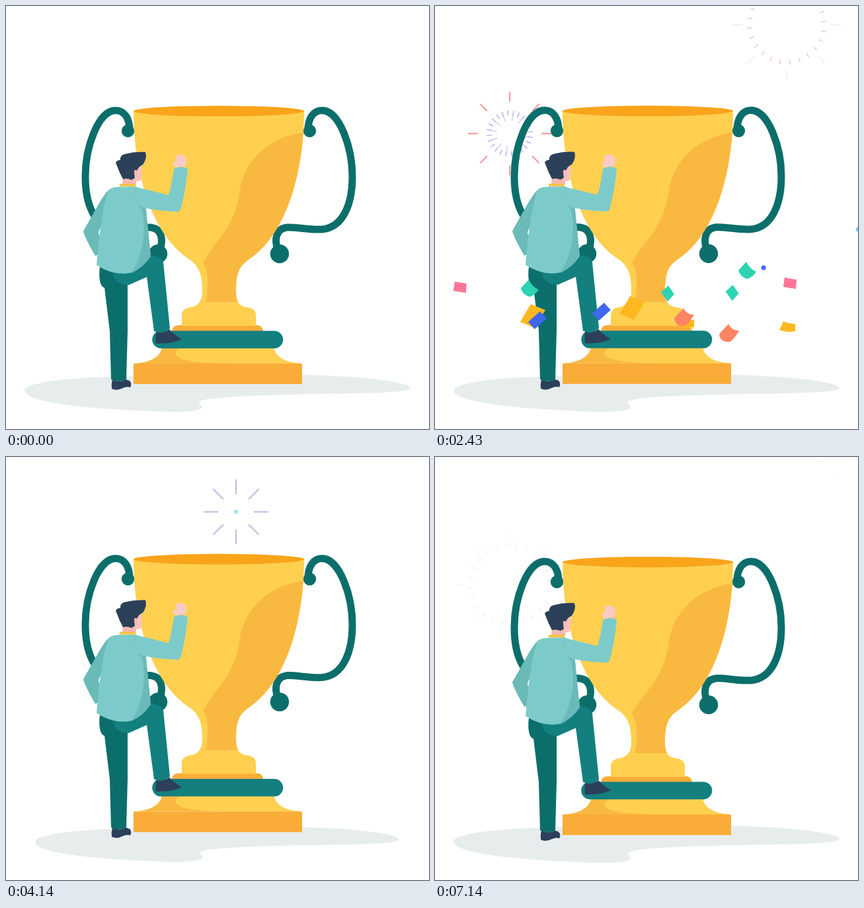
An HTML page with a canvas that plays this animation: 640x640 px, repeating every 7210 ms.

```html
<!DOCTYPE html>
<html lang="en">
<head>
<meta charset="utf-8">
<title>Trophy celebration</title>
<style>
html, body { margin: 0; height: 100%; overflow: hidden; background: #fff; }
canvas { display: block; width: 100vw; height: 100vh; object-fit: contain; }
</style>
</head>
<body>
<canvas id="stage" width="640" height="640"></canvas>
<script>
const ctx = document.getElementById('stage').getContext('2d');
const LOOP = 7210, BOB = LOOP / 3, FIREWORK_CYCLE = 3670;
const NAVY = '#2c405a', TEAL = '#137f7f', DARK_TEAL = '#0c6e6a', SHIRT = '#7ccbca',
      SHIRT_SHADE = '#6abab8', GOLD = '#ffd050', AMBER = '#f9b940', ORANGE = '#f9ac38';

const clamp = v => Math.min(1, Math.max(0, v));
const ramp = (v, from, to) => clamp((v - from) / (to - from));
const fill = (d, color) => { ctx.fillStyle = color; ctx.fill(new Path2D(d)); };
const disc = (x, y, r, color) => {
  ctx.fillStyle = color;
  ctx.beginPath();
  ctx.arc(x, y, r, 0, 7);
  ctx.fill();
};

// Timing curve cubic-bezier(.15, 0, .11, 1)
function ease(x) {
  const bezier = (a, b, s) => 3 * a * s * (1 - s) ** 2 + 3 * b * s * s * (1 - s) + s ** 3;
  let low = 0, high = 1;
  for (let i = 0; i < 24; i++) {
    const mid = (low + high) / 2;
    if (bezier(.15, .11, mid) < x) low = mid; else high = mid;
  }
  return bezier(0, 1, low);
}

function liftAt(t) {
  const phase = (t % BOB) / BOB * 2;
  return phase < 1 ? ease(phase) : 1 - ease(phase - 1);
}

function drawShadow(lift) {
  const scale = 1 - .3 * lift;
  ctx.save();
  ctx.translate(312, 590);
  ctx.scale(scale, scale);
  ctx.translate(-312, -590);
  fill('M28 582C28 568 110 561 190 560C300 557 400 556 448 558C540 560 612 569 612 578C612 587 500 586 430 588C360 590 300 592 292 599C290 603 298 603 296 608C290 615 250 615 220 613C110 609 28 598 28 582Z', '#e7eded');
  ctx.restore();
}

const CUP = 'M193 158C193 250 219 345 277 383C293 394 297 408 297 432C297 446 290 455 278 456Q266 458 266 468V484H378V468Q378 458 366 456C352 455 348 446 348 432C348 405 352 394 368 383C425 345 451 250 451 158Z';

function drawHandle() {
  ctx.strokeStyle = DARK_TEAL;
  ctx.lineWidth = 11;
  ctx.stroke(new Path2D('M457 188C457 170 465 158 478 158C505 158 524 215 524 258C524 300 510 335 478 338C455 339 440 334 425 335C408 337 406 354 411 368'));
  disc(459.5, 189, 9.7, DARK_TEAL);
  disc(414, 375, 14.2, DARK_TEAL);
}

function drawTrophy() {
  drawHandle();
  ctx.save();
  ctx.translate(644, 0);
  ctx.scale(-1, 1);
  drawHandle();
  ctx.restore();

  fill('M236 517C233 533 214 540 193 541H448C426 540 408 533 405 517Z', AMBER);
  fill('M265 517C250 525 254 534 285 538C310 541 340 541 350 541H448C426 540 408 533 405 517Z', GOLD);
  fill('M193 541H448V572H193Z', ORANGE);
  fill('M251 492Q252 483 262 483H379Q388 483 389 492Z', ORANGE);
  fill('M234.500 491.500H406A13.200 13.200 0 0 1 406 518H234.500A13.200 13.200 0 0 1 234.500 491.500Z', TEAL);
  fill(CUP, GOLD);
  ctx.save();
  ctx.clip(new Path2D(CUP));
  fill('M460 191C400 193 360 235 354 278C347 335 320 350 298 388C307 402 307 428 302 448H360V400L460 380Z', AMBER);
  ctx.restore();
  ctx.fillStyle = '#faa41a';
  ctx.beginPath();
  ctx.ellipse(322, 159, 129, 8, 0, 0, 7);
  ctx.fill();
}

function drawMan() {
  fill('M161 565Q172 571 181 565L187 567Q191 572 188 577Q183 575 177 578Q167 583 160 579Q159 572 161 565Z', NAVY);
  fill('M142 395C140 410 142 425 149 426L157 492L159 565Q171 571 182 565L184 492V400Z', DARK_TEAL);
  fill('M227 493Q237 497 247 489Q255 498 266 504Q258 508 245 510L227 511Q226 500 227 493Z', NAVY);
  fill('M161 403Q165 423 186 422L213 410L224 492Q237 497 248 488L238 388Q234 377 220 378Z', TEAL);
  fill('M160 276C150 280 146 290 117 341Q119 350 135 378L140 376Q142 360 143 349Q137 343 143 336L160 300Z', SHIRT_SHADE);
  fill('M155 279C160 272 175 274 196 273C207 276 212 292 213 320L219 378Q210 392 192 403Q165 410 137 392C140 360 144 310 155 279Z', SHIRT);
  fill('M196 278C193 290 200 300 206 310C214 345 204 385 189 404Q207 397 219 379L212 310L208 290Z', SHIRT_SHADE);
  fill('M197 274L246 286Q252 265 254 246Q265 241 275 246Q272 280 264 308Q262 312 256 311Q230 310 212 306Q204 305 200 300Q193 290 197 274Z', SHIRT);
  fill('M256 245L252 238L257 234Q255 226 259 226Q272 223 273 233L272 243Q264 242 256 245Z', '#f8cbc7');
  fill('M177 259H197V270H176Z', '#f4b8b0');
  fill('M172 269H196V273H172Z', '#f7c344');
  fill('M194 246L205 240Q207 248 204 264L196 266Z', '#f9c2bb');
  fill('M173 233Q172 226 180 224Q195 220 211 221Q214 230 207 240Q200 243 199 248Q193 250 195 260L190 263Q183 260 177 262L172 252L166 237Q168 233 173 233Z', NAVY);
  fill('M194 249Q198 246 198 252L197 258Q193 256 194 249Z', '#f4b8b0');
}

function drawSpokes(x, y, count, inner, outer, width, color, alpha, offset = 0) {
  if (alpha <= 0 || outer <= 0) return;
  ctx.globalAlpha = alpha;
  ctx.strokeStyle = color;
  ctx.lineWidth = width;
  ctx.beginPath();
  for (let i = 0; i < count; i++) {
    const angle = offset + i / count * Math.PI * 2, c = Math.cos(angle), s = Math.sin(angle);
    ctx.moveTo(x + c * inner, y + s * inner);
    ctx.lineTo(x + c * outer, y + s * outer);
  }
  ctx.stroke();
  ctx.globalAlpha = 1;
}

const fireworks = [
  { x: 348, y: 83, start: 50, reach: 119, ring: 88, ray: '#c9c2e6', spark: '#efa6ec', core: '#8fe0ee' },
  { x: 532, y: 28.5, start: 870, reach: 82, ring: 60, ray: '#f5709b', spark: '#dda6ee', core: '#86e38c' },
  { x: 113, y: 193, start: 1640, reach: 82, ring: 64, ray: '#f4a0a4', spark: '#b9a2ee', core: '#dcc9f6' }
];

function drawFirework({ x, y, start, reach, ring, ray, spark, core }, time) {
  const age = time - start;
  if (age < 0) return;
  const size = reach / 82;
  const outer = reach * clamp(age / 1025);
  const rayAlpha = 1 - .45 * ramp(age, 850, 1140) - .43 * ramp(age, 1140, 1440) - .12 * ramp(age, 1440, 2700);
  drawSpokes(x, y, 8, Math.max(outer * .45, outer - 15 * size), outer, 2 + .7 * (size - 1) + .3, ray, rayAlpha);

  const sparkAge = age - 400;
  if (sparkAge < 0) return;
  const radius = ring * (1 - (1 - clamp(sparkAge / 1200)) ** 2);
  const length = Math.min(radius * .4, ring * .12);
  const tilt = Math.PI / 18;
  const sparkAlpha = ramp(sparkAge, 180, 420) * (1 - .95 * ramp(sparkAge, 950, 1500) - .05 * ramp(sparkAge, 1500, 2500));
  const coreAlpha = 1 - ramp(sparkAge, 750, 1060);
  drawSpokes(x, y, 12, radius - 2 * length, radius - length, 1.5, core, coreAlpha, tilt);
  drawSpokes(x, y, 24, radius - length, radius, 1.5, core, coreAlpha * (1 - ramp(sparkAge, 180, 420)), tilt);
  drawSpokes(x, y, 24, radius - length, radius, 1.5, spark, sparkAlpha, tilt);
}

const scraps = {
  diamond: ['M-10 -2L1 -12L10 1L0 12Z', '#2ed3b1'],
  leaf: ['M-13 0L-1 -13Q4 -2 14 2Q8 11 0 13Q-11 9 -13 0Z', '#2ed3b1'],
  petal: ['M-14 1L0 -14Q4 -4 16 -4Q8 10 2 13Q-14 14 -14 1Z', '#ff8562'],
  pink: ['M-8 -8L10 -5L9 9L-10 6Z', '#ff7496'],
  square: ['M-3 -18L19 -9L3 18L-19 9Z', '#ffb81f'],
  blue: ['M-14 2L4 -14L14 -3L-4 13Z', '#4067ef'],
  strip: ['M-6 -9Q3 -5 12 -5L12 6Q0 9 -12 4Z', '#ffb81f']
};
for (const [name, color] of [['blueDot', '#4067ef'], ['skyDot', '#74cdf5'], ['pinkDot', '#ff7496'], ['greenDot', '#2ed3b1']])
  scraps[name] = ['M-3.500 0A3.500 3.500 0 1 1 3.500 0A3.500 3.500 0 1 1 -3.500 0Z', color];

// kind, then x and y after launch, mid-flight and at the end, then fade-out end
const confetti = [
  ['square', 14, 454, 298, 457, 345, 525, 3400],
  ['diamond', 41, 432, 352, 435, 330, 511, 3780],
  ['strip', -30, 454, 380, 480, 450, 550, 3400],
  ['petal', 53, 425, 376, 471, 430, 545, 3400],
  ['leaf', 57, 426, 472, 400, 496, 486, 4020],
  ['pink', 97, 414, 537, 419, 512, 510, 3880],
  ['strip', 99, 454, 533, 486, 605, 555, 3400],
  ['petal', -30, 440, 444, 495, 520, 560, 3400],
  ['blueDot', -30, 410, 497, 396, 585, 480, 3500],
  ['skyDot', -30, 390, 640, 338, 750, 420, 3400],
  ['pinkDot', -40, 420, 680, 440, 586, 512, 3960],
  ['pink', 527, 425, 38, 425, -40, 510, 3900],
  ['leaf', 564, 404, 143, 427, 32, 505, 4060],
  ['square', 559, 447, 148, 469, 75, 545, 3400],
  ['blue', 615, 433, 155, 476, 75, 555, 3400],
  ['blue', 660, 440, 252, 463, 180, 545, 3400],
  ['diamond', 660, 432, 450, 434, 220, 507, 3960],
  ['greenDot', 670, 430, -20, 440, 192, 527, 3720]
];

// Quadratic through (0, a), (m, b), (1, c)
const through = (a, b, c, m, u) =>
  a * (u - m) * (u - 1) / m + b * u * (u - 1) / (m * (m - 1)) + c * u * (u - m) / (1 - m);

function drawConfetti(t) {
  if (t < 1250 || t > 4100) return;
  const drag = time => (1 - Math.exp(-(time - 1500) / 520)) / (1 - Math.exp(-2140 / 520));
  for (const [kind, x1, y1, x2, y2, x3, y3, end] of confetti) {
    const x = through(x1, x2, x3, drag(2430), drag(t));
    const y = through(y1, y2, y3, 930 / 2140, (t - 1500) / 2140);
    ctx.save();
    ctx.translate(x, y);
    ctx.globalAlpha = 1 - ramp(t, end - 250, end);
    fill(...scraps[kind]);
    ctx.restore();
  }
}

function draw(now) {
  const t = now % LOOP, lift = liftAt(t);
  ctx.clearRect(0, 0, 640, 640);
  drawShadow(lift);
  for (const firework of fireworks) drawFirework(firework, t % FIREWORK_CYCLE);
  ctx.save();
  ctx.translate(0, -23 * lift);
  drawTrophy();
  drawMan();
  ctx.restore();
  drawConfetti(t);
}

const begin = performance.now();
function tick() {
  draw(performance.now() - begin);
  requestAnimationFrame(tick);
}
tick();
</script>
</body>
</html>
```
